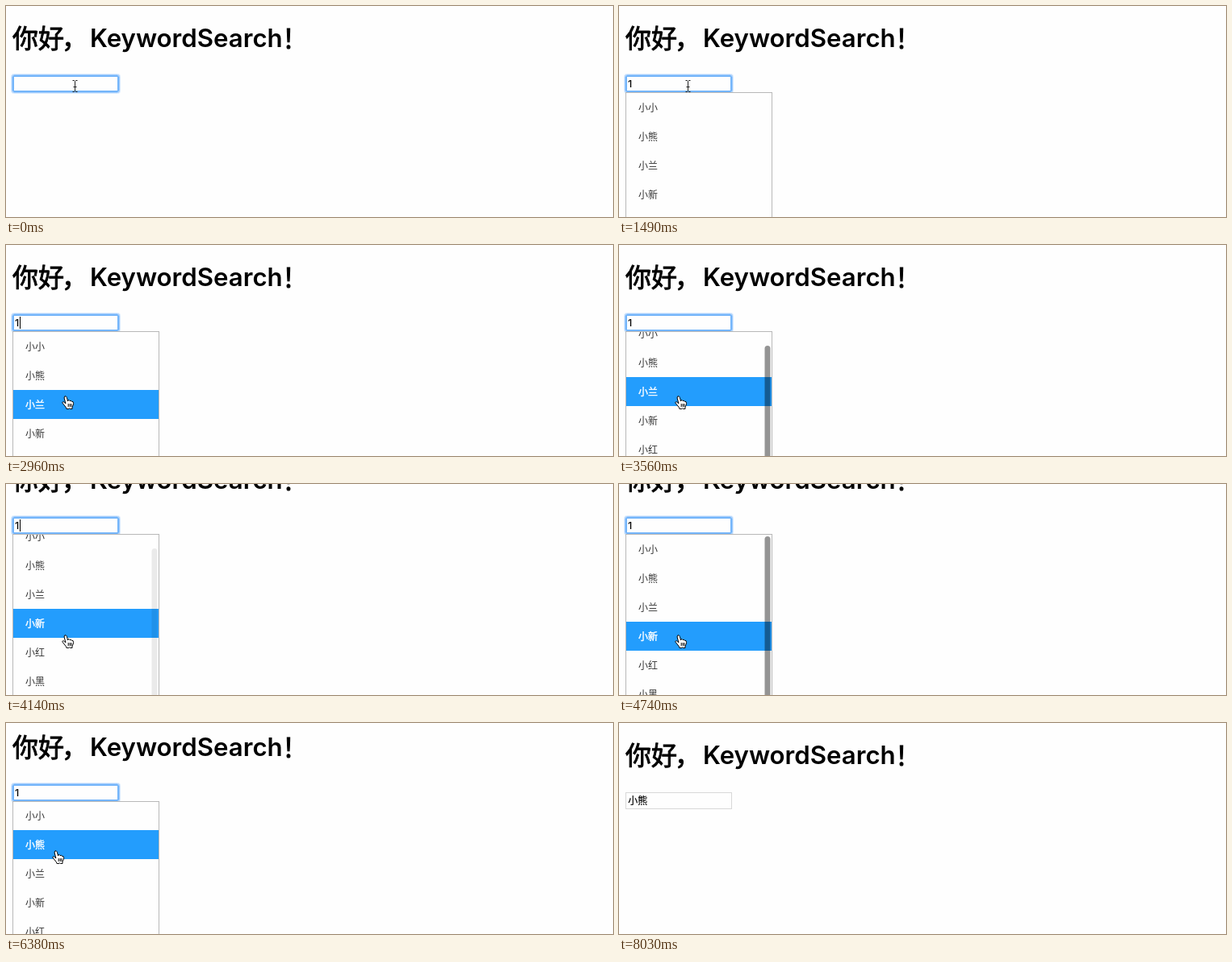
Recreate the animation shown at these times as an HTML page. Size 752 by 262 pixels, loop 9.95 s.

```html
<!DOCTYPE html>
<html lang="zh-CN">
<head>
<meta charset="utf-8">
<title>KeywordSearch</title>
<style>
html, body { margin: 0; width: 100%; height: 100%; overflow: hidden; background: #fefefe; }
svg { display: block; width: 752px; height: 262px; font-family: "Noto Sans CJK SC", sans-serif; }
.cjk { font-size: 32px; stroke: #000; stroke-width: .9px; }
.latin { font: 600 31.2px Inter, sans-serif; }
.item { font-size: 12px; fill: #333; }
.item.on { fill: #fff; stroke: #fff; stroke-width: .4px; }
.typed { font: 12px Inter, "Noto Sans CJK SC", sans-serif; stroke: #000; stroke-width: .2px; }
</style>
</head>
<body>
<svg viewBox="0 0 752 262">
  <defs>
    <clipPath id="inside"><rect x="9" y="108" width="180" height="300"/></clipPath>
  </defs>
  <g id="page">
    <text class="cjk" x="8" y="51.5">你好</text>
    <text class="cjk" x="69" y="51.5">，</text>
    <text class="latin" x="104" y="51">KeywordSearch</text>
    <text class="cjk" x="342" y="51.5">！</text>
    <rect id="plain" x="8.5" y="86.5" width="131" height="20" fill="#fefefe" stroke="#d8d8d8"/>
    <g id="focus" fill="none">
      <rect x="6.5" y="84.5" width="135" height="24" rx="3" stroke="#d9eafe"/>
      <rect x="7.5" y="85.5" width="133" height="22" rx="2" stroke="#9fcbfc"/>
      <rect x="9" y="87" width="130" height="19" rx="1" fill="#fefefe" stroke="#74b5fa" stroke-width="2"/>
    </g>
    <text id="value" class="typed" x="11.3" y="101"></text>
    <rect id="caret" y="89" width="1" height="15"/>
    <g id="list">
      <rect x="8.5" y="107.5" width="181" height="310" fill="#fefefe" stroke="#b8b8b8"/>
      <g clip-path="url(#inside)">
        <g id="rows"><rect id="hover" x="9" width="180" height="36" fill="#239dfd"/></g>
        <rect id="thumb" x="180.5" width="7" height="290" rx="3.5"/>
      </g>
    </g>
  </g>
  <g id="ibeam" fill="none" stroke="#222">
    <path d="M-3-7.5h2l1 1 1-1h2M-3 6.5h2l1-1 1 1h2M0-6.5v12M-2 .5h4"/>
  </g>
  <g id="hand" stroke="#000" stroke-linejoin="round" stroke-linecap="round">
    <path transform="translate(-4.5 -1)" fill="#fff" d="M4 1C5.3.4 6 1.2 6.4 2.6L7.6 7V6Q9.5 4.8 10 6.6 12 5.6 12.5 7.4 14.6 6.8 14.6 9.5 14.6 12 13 14V16.5H10.5Q9.6 15.2 8.8 16.5H6Q5.6 14.5 4 13L1 9.2C.4 7.6 2.2 7.2 3.4 8.6L4.9 10 3.1 3Q2.9 1.5 4 1ZM8.2 10.5v3M10.2 10.5v3M12 10.5v3"/>
  </g>
  <path id="arrow" d="M0 0V14L3.2 11 5.4 16 7.6 15 5.5 10.2H10Z" stroke="#fff" stroke-linejoin="round"/>
</svg>
<script>
const LOOP = 9950;
const el = id => document.getElementById(id);
const svgNS = "http://www.w3.org/2000/svg";

const labels = ["小小", "小熊", "小兰", "小新", "小红", "小黑", "小白", "小花"].map((name, i) => {
  const text = document.createElementNS(svgNS, "text");
  text.textContent = name;
  text.setAttribute("x", 24);
  text.setAttribute("y", 130.5 + i * 36);
  el("rows").append(text);
  return text;
});

// Progress from start to end in n equal jumps, the first one at start.
function steps(t, start, end, n) {
  if (t < start) return 0;
  return Math.min(1, (Math.floor((t - start + 5) / (end - start) * (n - 1)) + 1) / n);
}
const smooth = p => p * p * (3 - 2 * p);
const within = (t, a, b) => t >= a && t < b;
const show = (id, on) => el(id).setAttribute("display", on ? "inline" : "none");
const set = (id, name, v) => el(id).setAttribute(name, v);

const caretTimes = [[450, 1490], [1930, 2520], [2960, 3410], [4000, 4440], [4890, 5490], [5940, 6380]];

function pointer(t) {
  const stops = [[85.5, 100], [73.5, 188], [61.5, 159], [768, 270]];
  const moves = [[1930, 2960, 8], [5640, 6080, 4], [7280, 8030, 6]];
  let [x, y] = stops[0];
  moves.forEach((m, i) => {
    const p = smooth(steps(t, ...m));
    x += (stops[i + 1][0] - stops[i][0]) * p;
    y += (stops[i + 1][1] - stops[i][1]) * p;
  });
  return [x, y];
}

function pageScroll(t) {
  if (t >= 6680) return 0;
  return Math.round(45 * smooth(steps(t, 3710, 4000, 3)) - 35 * smooth(steps(t, 4890, 5190, 3)));
}

function listScroll(t) {
  return 16 * steps(t, 3410, 3560, 2) - 16 * steps(t, 4590, 4740, 2) + (t >= 5640 ? 1 : 0);
}

function thumbAlpha(t) {
  if (within(t, 3410, 4140) || within(t, 4590, 5790)) return 0.42;
  return within(t, 4140, 4290) ? 0.08 : within(t, 5790, 5940) ? 0.2 : 0;
}

function draw(t) {
  const open = within(t, 900, 6680), focused = t < 6680;
  const top = pageScroll(t), inner = listScroll(t);
  const [x, y] = pointer(t);

  set("page", "transform", `translate(0 ${-top})`);
  show("plain", !focused);
  show("focus", focused);
  el("value").textContent = t < 750 ? "" : focused ? "1" : "小熊";
  show("caret", caretTimes.some(([a, b]) => within(t, a, b)));
  set("caret", "x", t < 750 ? 11 : 17);

  const row = Math.floor((y + top + inner - 108) / 36);
  const over = open && row >= 0;
  show("list", open);
  set("rows", "transform", `translate(0 ${-inner})`);
  show("hover", over);
  set("hover", "y", 108 + row * 36);
  labels.forEach((label, i) => label.setAttribute("class", over && i === row ? "item on" : "item"));
  set("thumb", "y", 110 + inner * 0.94);
  set("thumb", "fill-opacity", thumbAlpha(t));

  const shape = !focused ? "arrow" : over ? "hand" : "ibeam";
  for (const id of ["ibeam", "hand", "arrow"]) show(id, id === shape && t < 8030);
  set(shape, "transform", `translate(${x} ${y})`);
}

const begin = performance.now();
function tick() {
  draw((performance.now() - begin) % LOOP);
  requestAnimationFrame(tick);
}
tick();
</script>
</body>
</html>
```
